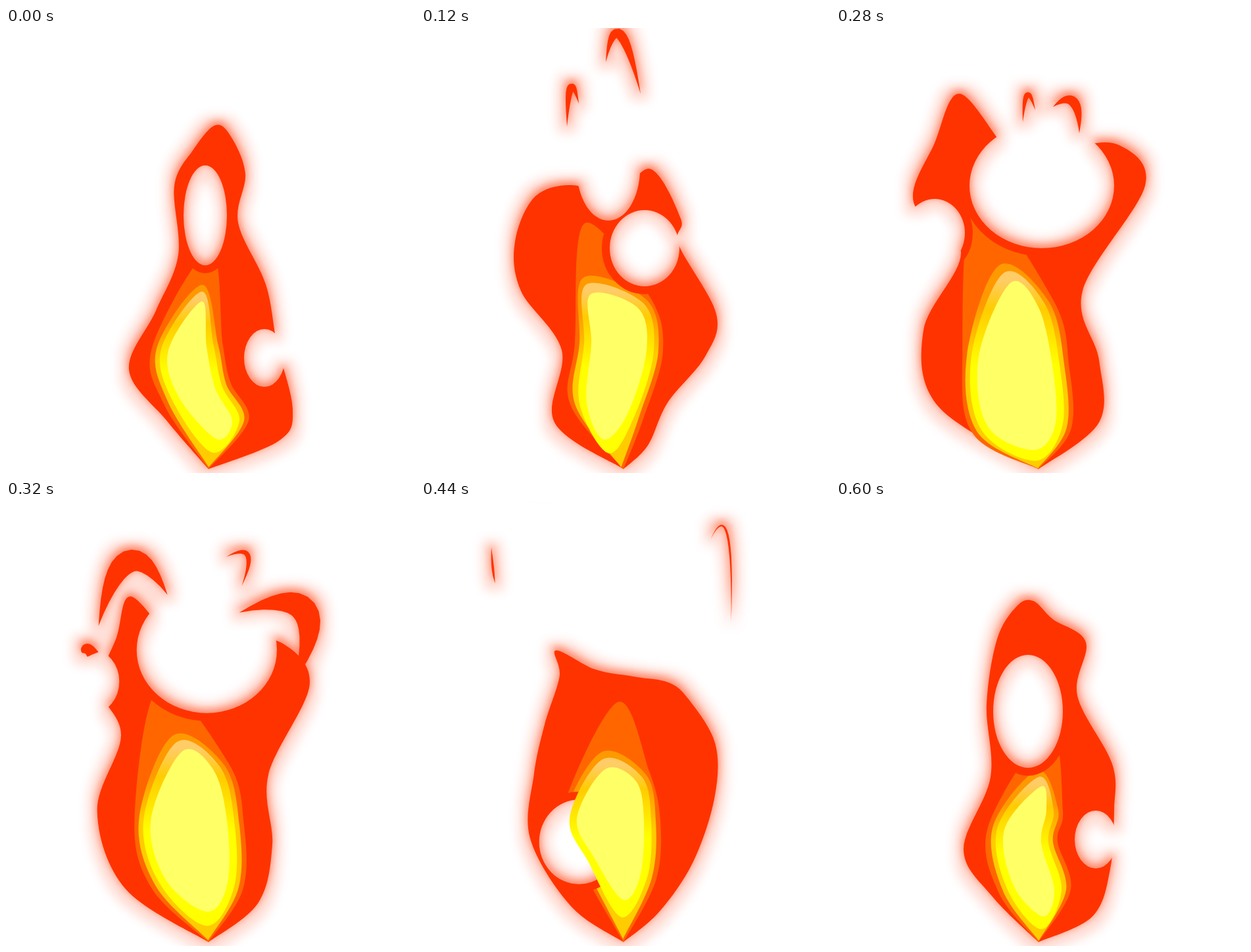
Animation of 622x677 px, one loop 0.64 s. Source, as an HTML page:

```html
<!DOCTYPE html>
<html lang="en">
<head>
<meta charset="utf-8">
<title>Flame</title>
<style>
  html, body { margin: 0; width: 100%; height: 100%; overflow: hidden; background: #fff; }
  svg { display: block; width: 100vw; height: 100vh; }
</style>
</head>
<body>
<svg viewBox="0 0 622 677" preserveAspectRatio="none">
  <defs>
    <filter id="glow" filterUnits="userSpaceOnUse" x="-60" y="-60" width="742" height="800" color-interpolation-filters="sRGB">
      <feMorphology in="SourceGraphic" operator="dilate" radius="14"/>
      <feGaussianBlur stdDeviation="8"/>
      <feComponentTransfer result="wide"><feFuncA type="linear" slope=".17"/></feComponentTransfer>
      <feMorphology in="SourceGraphic" operator="dilate" radius="2"/>
      <feGaussianBlur stdDeviation="6"/>
      <feOffset dy="-4"/>
      <feComponentTransfer result="near"><feFuncA type="linear" slope=".5"/></feComponentTransfer>
      <feMerge><feMergeNode in="wide"/><feMergeNode in="near"/><feMergeNode in="SourceGraphic"/></feMerge>
    </filter>
    <linearGradient id="warm" x2="0" y2="1">
      <stop offset=".2" stop-color="#f90"/><stop offset=".42" stop-color="#fc0"/>
    </linearGradient>
    <linearGradient id="rim" x2="0" y2="1">
      <stop offset=".05" stop-color="#fc6"/><stop offset=".2" stop-color="#fc0"/><stop offset=".5" stop-color="#ff0"/>
    </linearGradient>
    <mask id="bitten" maskUnits="userSpaceOnUse" x="0" y="0" width="622" height="677">
      <path d="M0 0H622V677H0Z" fill="#fff"/><path class="bites"/>
    </mask>
    <mask id="cooled" maskUnits="userSpaceOnUse" x="0" y="0" width="622" height="677">
      <path d="M0 0H622V677H0Z" fill="#fff"/><path class="bites" stroke="#000" stroke-width="24"/>
    </mask>
  </defs>
  <g fill="#f30" filter="url(#glow)">
    <path class="body" mask="url(#bitten)"/>
    <path class="wisps"/>
  </g>
  <g mask="url(#cooled)">
    <path class="orange" fill="#f60"/>
    <path class="amber" fill="url(#warm)"/>
  </g>
  <path class="yellow" fill="url(#rim)"/>
  <path class="pale" fill="#ff6"/>
</svg>
<script>
const LOOP = 640, STEP = 40, FOOT = [308, 671];

// Key poses by time: body edge from the foot up the left side and down the right.
const bodyPoses = {
  0: '245,598 187,520 228,430 262,345 256,240 285,185 318,148 342,165 364,222 353,296 395,390 412,480 436,580 415,628',
  120: '203,600 214,490 152,400 143,325 175,255 238,240 285,275 347,214 395,290 392,330 449,435 432,500 375,570 345,635',
  200: '190,600 168,520 185,420 123,300 150,215 240,205 280,225 331,150 394,222 378,250 450,272 466,345 395,480 367,575',
  280: '155,575 133,460 190,340 118,265 150,175 188,100 260,185 313,225 360,185 430,178 470,240 375,400 400,505 400,600',
  400: '235,620 150,495 145,390 190,320 205,270 194,236 255,288 300,300 350,278 400,293 445,360 447,450 415,560 350,635',
  520: '215,610 198,550 225,470 184,380 222,260 228,210 285,193 382,203 428,272 420,318 453,390 444,460 410,530 386,606',
  600: '238,602 194,530 235,420 229,310 245,210 275,160 300,152 330,180 380,215 367,296 420,400 423,470 417,560 390,632'
};

// Hottest part: bottom, left side, top (index 3), right side; last comes the tip of the tongue above it.
const corePoses = {
  0: '320,625 262,560 247,490 298,416 305,485 318,548 344,598 311,338',
  120: '278,626 252,570 259,480 258,405 330,426 343,490 315,585 249,297',
  200: '285,636 237,580 245,490 270,406 330,408 318,500 316,600 240,269',
  280: '300,642 230,605 217,500 265,388 308,425 330,520 333,605 213,263',
  400: '315,590 268,517 227,455 275,366 335,385 351,445 342,545 275,322',
  520: '292,640 258,600 257,540 290,492 312,510 315,570 316,620 345,275',
  600: '315,632 270,585 256,500 312,434 320,470 312,520 332,592 325,352'
};

// Cold air pockets that rise through the flame: center, then radii.
const bites = [
  { 400: '470,580 30,40', 520: '410,552 47,60', 600: '395,515 32,44', 640: '393,502 31,44',
    760: '340,335 53,58', 840: '321,283 61,75', 920: '313,240 110,95', 1040: '290,200 100,98' },
  { 400: '228,587 56,54', 520: '265,382 70,85', 600: '292,320 53,86', 640: '303,285 33,76',
    760: '285,215 48,78', 840: '258,225 20,32', 920: '255,180 5,5' },
  { 120: '130,430 20,25', 200: '178,392 36,48', 280: '150,312 46,52', 400: '95,200 30,40' }
];

// Torn-off ribbons: start, end, control and width (with 0) at two times; they go on until the width is gone.
const wisps = [
  { 0: '268,275 315,78 355,290 50,0', 120: '281,52 298,-56 334,100 15,0' },
  { 0: '258,280 255,235 275,230 20,0', 120: '222,150 224,50 240,115 11,0' },
  { 200: '320,190 340,140 393,222 30,0', 280: '330,120 372,85 370,160 15,0' },
  { 200: '258,258 280,200 325,175 25,0', 280: '284,143 288,70 303,125 8,0' },
  { 280: '326,207 524,152 425,310 50,0', 400: '412,95 488,25 460,215 15,0' },
  { 280: '119,285 170,38 270,198 45,0', 400: '184,0 195,-20 197,32 13,0' },
  { 280: '119,285 122,262 150,265 25,0', 400: '110,124 112,145 122,160 9,0' }
];

const parse = text => text.split(' ').map(p => p.split(',').map(Number));
const track = poses => Object.entries(poses).map(([t, text]) => ({ t: +t, points: parse(text) }));
const cyclic = poses => track({ ...poses, [LOOP]: poses[0] });
const lerp = (a, b, u) => [a[0] + (b[0] - a[0]) * u, a[1] + (b[1] - a[1]) * u];

// Points of a track at a time; past the last key the motion continues.
function pose(keys, t) {
  let i = keys.findIndex(k => k.t > t);
  if (i < 1) i = keys.length - 1;
  const a = keys[i - 1], b = keys[i];
  return a.points.map((p, n) => lerp(p, b.points[n], (t - a.t) / (b.t - a.t)));
}

// Closed Catmull-Rom curve, optionally with a sharp corner at the first point.
function smooth(points, sharp) {
  const n = points.length, at = i => points[(i + n) % n];
  let d = 'M' + points[0];
  for (let i = 0; i < n; i++) {
    const b = at(i), c = at(i + 1);
    const a = sharp && i === 0 ? b : at(i - 1), e = sharp && i === n - 1 ? c : at(i + 2);
    const c1 = [0, 1].map(k => b[k] + (c[k] - a[k]) / 6), c2 = [0, 1].map(k => c[k] - (e[k] - b[k]) / 6);
    d += `C${c1} ${c2} ${c}`;
  }
  return d + 'Z';
}

// The core grown outwards, its top pulled to the tip and its bottom to the foot.
function layer(core, grow, reach, sink) {
  const ring = core.slice(0, -1), n = ring.length;
  const out = ring.map((p, i) => {
    const a = ring[(i + n - 1) % n], b = ring[(i + 1) % n];
    const dx = b[0] - a[0], dy = b[1] - a[1], size = Math.hypot(dx, dy);
    return [p[0] + grow * dy / size, p[1] - grow * dx / size];
  });
  out[3] = lerp(out[3], core[n], reach);
  out[0] = lerp(out[0], FOOT, sink);
  return smooth(out, sink > .5);
}

function ellipse([[x, y], [rx, ry]]) {
  return `M${x - rx} ${y}a${rx} ${ry} 0 1 0 ${2 * rx} 0a${rx} ${ry} 0 1 0 ${-2 * rx} 0Z`;
}

// Quadratic curve with a width that tapers to both ends.
function ribbon([from, bend, to, [width]]) {
  const left = [], right = [];
  for (let s = 0; s <= 1.001; s += 1 / 16) {
    const a = lerp(from, bend, s), b = lerp(bend, to, s), [x, y] = lerp(a, b, s);
    const dx = b[0] - a[0], dy = b[1] - a[1];
    const half = width / 2 * Math.sin(Math.PI * Math.min(s, 1)) / (Math.hypot(dx, dy) || 1);
    left.push([x + dy * half, y - dx * half]);
    right.unshift([x - dy * half, y + dx * half]);
  }
  return 'M' + [...left, ...right].join('L') + 'Z';
}

const bodyTrack = cyclic(bodyPoses), coreTrack = cyclic(corePoses);
const biteTracks = bites.map(track), wispTracks = wisps.map(track);

function bitesAt(t) {
  return biteTracks.flatMap(keys => [t, t + LOOP]
    .filter(s => s >= keys[0].t && s < keys[keys.length - 1].t)
    .map(s => ellipse(pose(keys, s)))).join('');
}

function wispsAt(t) {
  return wispTracks.filter(keys => t > keys[0].t).map(keys => pose(keys, t))
    .filter(shape => shape[3][0] > 0).map(ribbon).join('');
}

function set(name, d) {
  document.querySelectorAll('.' + name).forEach(path => path.setAttribute('d', d));
}

function draw(now) {
  const t = Math.floor(now % LOOP / STEP) * STEP;
  const core = pose(coreTrack, t);
  set('body', smooth([FOOT, ...pose(bodyTrack, t)], true));
  set('bites', bitesAt(t));
  set('wisps', wispsAt(t) || 'M0 0');
  set('orange', layer(core, 25, 1, 1));
  set('amber', layer(core, 18, .12, .9));
  set('yellow', layer(core, 11, .06, .3));
  set('pale', layer(core, 0, 0, 0));
}

function tick() {
  draw(performance.now());
  requestAnimationFrame(tick);
}
tick();
</script>
</body>
</html>
```
